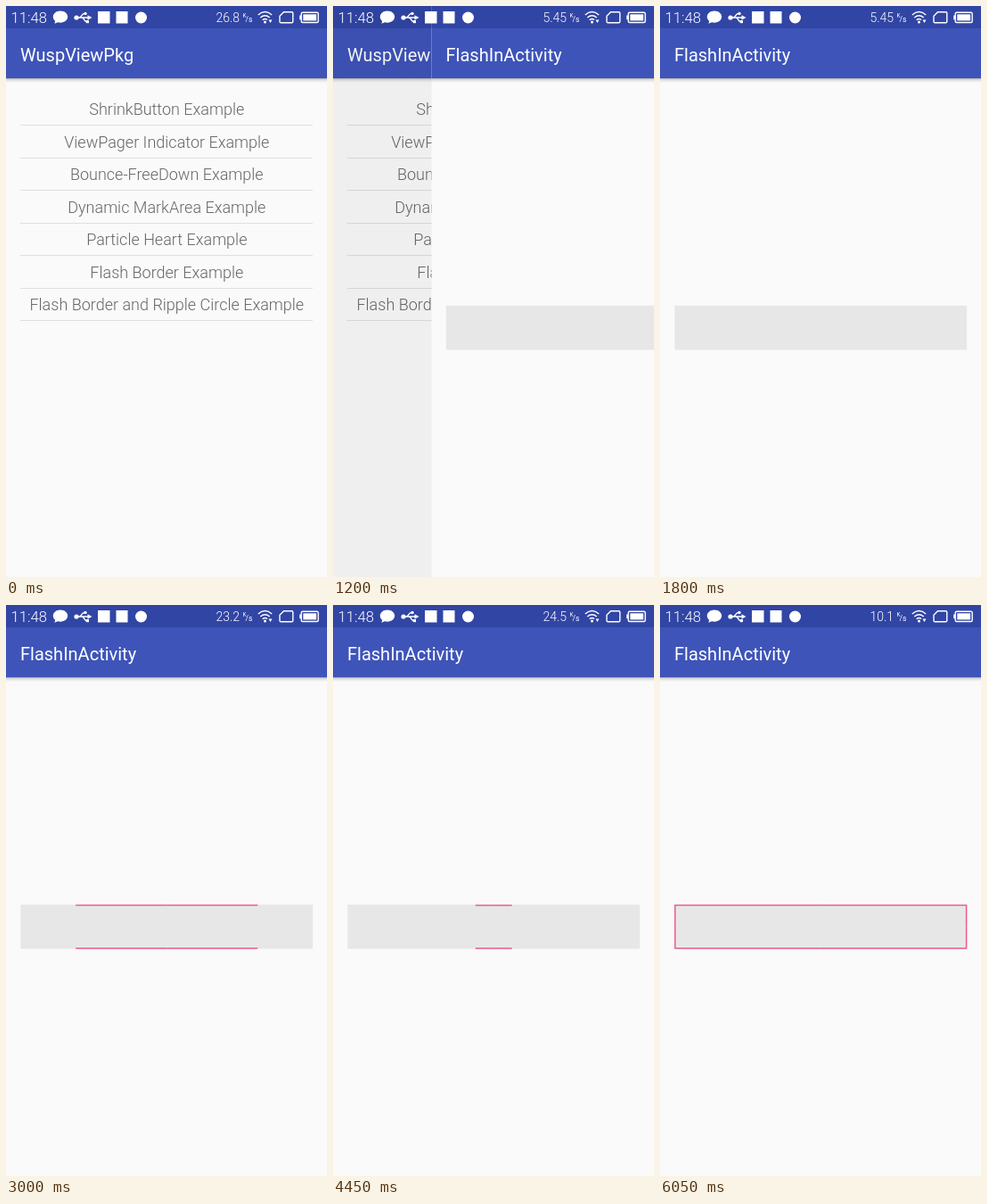
These frames come from a looping animation (360x640 px, 6100 ms). An HTML page:

```html
<!DOCTYPE html>
<html lang="en">
<head>
<meta charset="utf-8">
<title>Flash border</title>
<style>
html, body { margin: 0; width: 100%; height: 100%; overflow: hidden; background: #fafafa; }
svg { display: block; width: 360px; height: 640px; font-family: Roboto, sans-serif; }
.title { font-size: 20px; fill: #fff; }
.item { font-size: 18px; font-weight: 300; fill: #666; text-anchor: middle; }
.rule { fill: #dfdfdf; }
.thin { fill: none; stroke: #fff; stroke-width: 1.4; }
.edge { fill: none; stroke: #ee5c89; stroke-width: 1.5; }
</style>
</head>
<body>
<svg viewBox="0 0 360 640">
  <defs>
    <linearGradient id="fade" x2="0" y2="1">
      <stop offset="0" stop-color="#000" stop-opacity=".3"/>
      <stop offset=".4" stop-color="#000" stop-opacity=".1"/>
      <stop offset="1" stop-color="#000" stop-opacity="0"/>
    </linearGradient>
    <g id="page">
      <rect width="360" height="640" fill="#fafafa"/>
      <rect y="81" width="360" height="5" fill="url(#fade)"/>
      <rect width="360" height="81" fill="#3e54b9"/>
      <rect width="360" height="25" fill="#3145a4"/>
    </g>
  </defs>

  <g id="home">
    <use href="#page"/>
    <text class="title" x="16" y="62">WuspViewPkg</text>
    <g id="list"></g>
  </g>
  <rect id="dim" width="360" height="640"/>

  <g id="detail">
    <use href="#page"/>
    <text class="title" x="16" y="62">FlashInActivity</text>
    <rect x="16.3" y="335.8" width="327.8" height="49.6" fill="#e7e7e7"/>
    <g id="border"></g>
  </g>

  <g id="status" fill="#fff">
    <text x="5.6" y="19" font-size="16.7" font-weight="300">11:48</text>
    <path d="M61 5.5c4.7 0 8.2 2.9 8.2 6.6s-3.5 6.6-8.2 6.6c-1 0-2-.1-2.900-.4l-3.700 1.500.8-2.900c-1.500-1.200-2.400-2.900-2.400-4.800 0-3.700 3.500-6.600 8.200-6.600z"/>
    <g>
      <circle cx="79" cy="13" r="2.6"/>
      <path class="thin" d="M79 13H92M82 13C85 13 84.500 8.500 88 8.500H89M85 13C88 13 87.500 17.500 90 17.500H91"/>
      <path d="M91.500 10.300L96.500 13L91.500 15.700z"/>
      <circle cx="89" cy="8.500" r="1.700"/>
      <rect x="89.800" y="16" width="3.200" height="3.200"/>
    </g>
    <rect x="103" y="6" width="13.500" height="13.500"/>
    <rect x="123.500" y="6" width="13" height="13.500"/>
    <circle cx="151.500" cy="13" r="6.500"/>
    <text id="speed" x="235.400" y="17.600" font-size="14" font-weight="300"></text>
    <text x="265.500" y="12.500" font-size="6.500">K</text>
    <text x="268.500" y="17.500" font-size="8.500">/s</text>
    <g class="thin" stroke-width="1.600">
      <path d="M282.800 10Q290.500 3.200 298.200 10"/>
      <path d="M285.300 13Q290.500 8.500 295.700 13"/>
      <path d="M287.700 15.800Q290.500 13.500 293 15.500"/>
    </g>
    <circle cx="290.500" cy="18" r="1.500"/>
    <path d="M294.500 15.500h4l-2 3.500z"/>
    <path class="thin" d="M311.500 6.800H320.500Q321.800 6.800 321.800 8V17.500Q321.800 18.700 320.500 18.700H308.300Q307 18.700 307 17.500V11.300z"/>
    <rect class="thin" x="331.200" y="7.200" width="19" height="11.300" rx="1.500"/>
    <rect x="333.300" y="9.300" width="14.800" height="7.100"/>
    <rect x="329.200" y="10.500" width="1.800" height="4.700"/>
  </g>
</svg>
<script>
const LOOP = 6100;
const $ = id => document.getElementById(id);

function add(parent, tag, attrs, text = "") {
  const el = document.createElementNS("http://www.w3.org/2000/svg", tag);
  for (const k in attrs) el.setAttribute(k, attrs[k]);
  el.textContent = text;
  parent.append(el);
  return el;
}

const items = ["ShrinkButton", "ViewPager Indicator", "Bounce-FreeDown", "Dynamic MarkArea",
  "Particle Heart", "Flash Border", "Flash Border and Ripple Circle"];
items.forEach((name, i) => {
  const y = i * 36.5;
  add($("list"), "text", { class: "item", x: 180.3, y: 122.4 + y }, name + " Example");
  add($("list"), "rect", { class: "rule", x: 16, y: Math.round(133 + y), width: 328, height: 1 });
});

// Four arms run from the middle of the long sides, round the corners, to the short sides.
const box = { left: 16.9, right: 343.6, top: 336.6, bottom: 384.8 };
const midX = (box.left + box.right) / 2;
const midY = (box.top + box.bottom) / 2;
const arms = [];
for (const y of [box.top, box.bottom])
  for (const x of [box.left, box.right])
    arms.push(add($("border"), "path", { class: "edge", d: `M${midX} ${y}H${x}V${midY}` }));

const clamp = v => Math.min(1, Math.max(0, v));
const ramp = (t, start, length) => clamp((t - start) / length);
const speeds = [[6050, "10.1"], [4050, "24.5"], [2050, "23.2"], [50, "5.45"], [0, "26.8"]];

function draw(t) {
  const slide = ramp(t, 971, 707);
  const x = 360 * (1 - slide) ** 3;
  $("detail").setAttribute("transform", `translate(${x.toFixed(2)} 0)`);
  $("dim").setAttribute("opacity", 0.135 * slide);

  const flash = ramp(t, t < 4000 ? 1950 : 4024, 2000);
  const reach = 189 * (0.5 - 0.5 * Math.cos(Math.PI * flash));
  $("border").setAttribute("visibility", reach > 0 ? "visible" : "hidden");
  for (const arm of arms) arm.setAttribute("stroke-dasharray", `${reach.toFixed(2)} 999`);

  $("speed").textContent = speeds.find(([from]) => t >= from)[1];
}

const begin = performance.now();
function tick() {
  draw((performance.now() - begin) % LOOP);
  requestAnimationFrame(tick);
}
tick();
</script>
</body>
</html>
```
